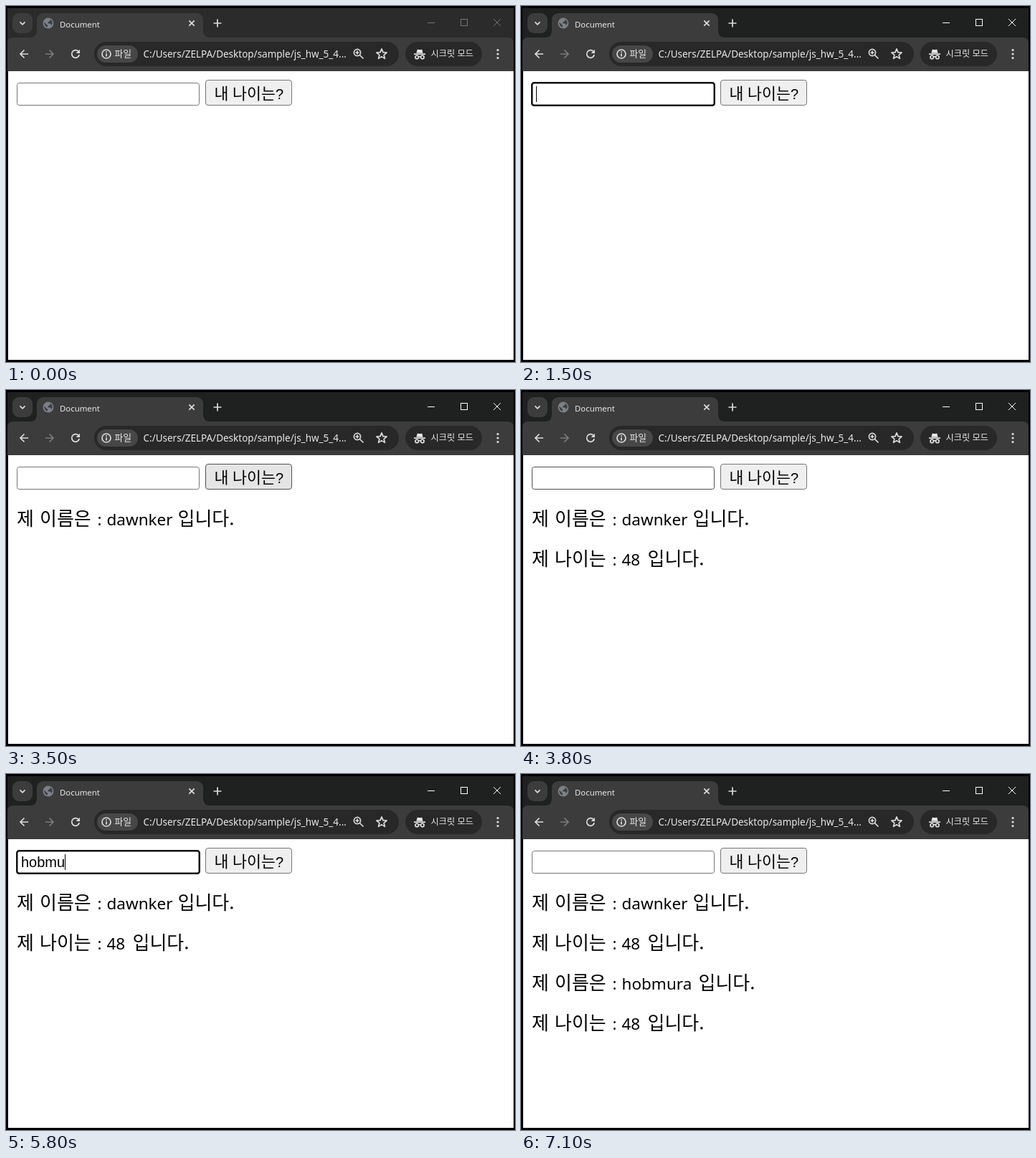
An HTML page that plays this animation: 710 px wide and 497 px high, repeating every 8000 ms.

```html
<!DOCTYPE html>
<html lang="ko">
<head>
<meta charset="utf-8">
<title>Document</title>
<style>
html, body { margin: 0; width: 100%; height: 100%; overflow: hidden; background: #000; }
svg { display: block; width: 710px; height: 497px; }
text { white-space: pre; }
.ui { font-family: "Noto Sans", "Noto Sans CJK KR", sans-serif; fill: #e8e8e8; }
.ko { font-family: "Noto Sans CJK KR", "Noto Sans CJK", sans-serif; }
.form { font: 20px "Liberation Sans", Arial, sans-serif; }
.label { font-size: 21.7px; font-weight: 300; }
.row .ko { font-size: 26px; }
.row .latin { font: 22.5px "Noto Sans", sans-serif; }
.line { fill: none; stroke: #dcdcdc; stroke-width: 1.7; }
.dim { stroke: #7c7c7c; }
#bar { fill: #1f2020; }
#controls { fill: none; stroke: #fff; }
.inactive #bar { fill: #2b2b2b; }
.inactive #controls { stroke: #777; }
#box { fill: #fff; stroke: #767676; }
#box.hover { stroke: #4f4f4f; }
#button { fill: #efefef; stroke: #767676; }
#button.hover { fill: #e5e5e5; stroke: #4f4f4f; }
#button.press { fill: #f5f5f5; stroke: #8d8d8d; }
</style>
</head>
<body>
<svg id="stage" viewBox="0 0 710 497">
  <rect width="710" height="497"/>
  <rect id="bar" x="2" y="3" width="706" height="60"/>
  <g fill="#3c3c3c">
    <path d="M2 91V52Q2 44 10 44H700Q708 44 708 52V91Z"/>
    <path d="M33 44Q43 44 43 34V20Q43 10 53 10H265Q275 10 275 20V34Q275 44 285 44Z"/>
    <rect x="9" y="10" width="28" height="28" rx="9"/>
  </g>
  <rect x="3" y="91" width="705" height="403" fill="#fff"/>

  <path class="line" d="M19.5 22.3L23 25.8L26.5 22.3"/>
  <g transform="translate(59 24)">
    <circle r="7.4" fill="#7d8186"/>
    <path d="M-5.8 -1.5L-1 3V5.6Q-5.5 4.5 -5.8 -1.5ZM-1 -5.6H2.5V-3L-.5 -1.5V.5H3L4 3L5.6 .5Q6 -4.5 1.5 -5.8Z" fill="#3c3c3c"/>
  </g>
  <text class="ui" x="75" y="30" font-size="11.4">Document</text>
  <path class="line" d="M255.3 20.3L262.7 27.7M262.7 20.3L255.3 27.7"/>
  <path class="line" d="M289.5 24H300.5M295 18.5V29.5"/>
  <g id="controls">
    <path d="M588 23.5H598"/>
    <rect x="634.5" y="18.5" width="9" height="9"/>
    <path d="M680 18L690 28M690 18L680 28"/>
  </g>

  <path id="arrow" class="line" d="M31 67H20M25.5 61.5L20 67L25.5 72.5"/>
  <path class="line dim" d="M55 67H66M60.5 61.5L66 67L60.5 72.5"/>
  <g transform="translate(97 67)">
    <path class="line" d="M4.4 -3A5.3 5.3 0 1 0 5.2 1"/>
    <path d="M6 -6.3V-1H.7Z" fill="#dcdcdc"/>
  </g>

  <rect x="123" y="50" width="425" height="34" rx="17" fill="#282828"/>
  <rect x="127" y="55" width="57" height="24" rx="12" fill="#474747"/>
  <circle class="line" cx="140" cy="67" r="6" stroke-width="1.5"/>
  <path class="line" d="M140 66.2V70.5M140 63.3V65"/>
  <text class="ui ko" x="151.5" y="71.3" font-size="12.8" font-weight="500">파일</text>
  <text class="ui" x="191.5" y="72" font-size="13.5">C:/Users/ZELPA/Desktop/sample/js_hw_5_4...</text>
  <g transform="translate(491.5 66.5)">
    <circle class="line" cx="-1.5" cy="-1.5" r="4.6"/>
    <path class="line" d="M2 2L7 7"/>
    <path class="line" stroke-width="1.2" d="M-4 -1.5H1M-1.5 -4V1"/>
  </g>
  <path class="line" stroke-linejoin="round" transform="translate(524 67.3)" stroke-width="1.5"
    d="M0 -7.5L1.94 -2.67L7.1 -2.3L3.1 1L4.4 6.1L0 3.3L-4.4 6.1L-3.1 1L-7.1 -2.3L-1.94 -2.67Z"/>

  <rect x="557" y="50" width="107" height="34" rx="17" fill="#282828"/>
  <g transform="translate(577 67)">
    <path d="M-4.6 -1.2L-3.2 -6.6Q0 -5.3 3.2 -6.6L4.6 -1.2Z" fill="#e8e8e8"/>
    <path class="line" d="M-8 .2H8M-1.5 4Q0 3 1.5 4"/>
    <circle class="line" cx="-3.8" cy="4.4" r="2.3"/>
    <circle class="line" cx="3.8" cy="4.4" r="2.3"/>
  </g>
  <text class="ui ko" x="592.5" y="71" font-size="12.2" font-weight="500">시크릿 모드</text>
  <g fill="#dcdcdc">
    <circle cx="686" cy="61.5" r="1.6"/><circle cx="686" cy="67" r="1.6"/><circle cx="686" cy="72.5" r="1.6"/>
  </g>

  <rect id="box" x="15.5" y="107.5" width="254" height="31" rx="3"/>
  <rect id="ring" x="15.25" y="107.25" width="254.5" height="31.5" rx="3" fill="#fff" stroke="#101010" stroke-width="2.5"/>
  <text id="typed" class="form" x="21" y="130"></text>
  <rect id="caret" y="112" width="1" height="22"/>
  <rect id="button" x="278.5" y="103.5" width="120" height="35" rx="3.5"/>
  <text class="ko label" x="290.5" y="130">내</text>
  <text class="ko label" x="316" y="130">나이는</text>
  <text class="form" x="376" y="130">?</text>
  <g id="rows"></g>
</svg>
<script>
const LOOP = 8000;
const $ = id => document.getElementById(id);
const names = ["dawnker", "hobmura"];

// [time, value] steps; each value holds until the next step
const at = (steps, t) => steps.reduce((v, [from, next]) => t >= from ? next : v, steps[0][1]);

const focus = [[0, 0], [500, 1], [3400, 0], [4100, 1], [6800, 0]];
const boxState = [[0, ""], [300, "hover"], [3300, ""], [3800, "hover"], [6700, ""]];
const buttonState = [
  [0, ""], [3300, "hover"], [3400, "press"], [3500, "hover"], [3700, ""],
  [6700, "hover"], [6800, "press"], [6900, "hover"], [7100, ""]
];
const caretOn = [
  [0, 0], [500, 1], [1000, 0], [1500, 1], [2000, 0], [2200, 1], [3300, 0],
  [4100, 1], [4600, 0], [5000, 1], [6500, 0]
];
const letters = [
  [0, 0], [2200, 2], [2300, 3], [2500, 4], [2700, 5], [2800, 7], [3500, 0],
  [5000, 1], [5100, 2], [5400, 3], [5600, 4], [5800, 5], [5900, 6], [6000, 7], [6900, 0]
];
const rowTimes = [3500, 3600, 6900, 7000];

function row(y, label, value, endX) {
  const put = (cls, x, s) => `<text class="${cls}" x="${x}" y="${y}">${s}</text>`;
  return `<g class="row">${put("ko", 15, "제")}${put("ko", 47, label)}${put("latin", 127.5, ":")}` +
    `${put("latin", 140.5, value)}${put("ko", endX, "입니다.")}</g>`;
}
$("rows").innerHTML =
  row(189, "이름은", names[0], 239.5) + row(245, "나이는", "48", 176.5) +
  row(301, "이름은", names[1], 247.5) + row(357, "나이는", "48", 176.5);
const rows = [...$("rows").children];

const show = (el, on) => el.setAttribute("visibility", on ? "visible" : "hidden");

function draw() {
  const t = performance.now() % LOOP;
  const typed = $("typed");
  const text = names[t < 4000 ? 0 : 1].slice(0, at(letters, t));
  if (typed.textContent !== text) typed.textContent = text;
  const width = text ? typed.getComputedTextLength() : 0;
  $("caret").setAttribute("x", Math.floor(21 + width));
  show($("caret"), at(caretOn, t));
  show($("ring"), at(focus, t));
  $("box").setAttribute("class", at(boxState, t));
  $("button").setAttribute("class", at(buttonState, t));
  $("stage").setAttribute("class", t < 500 ? "inactive" : "");
  rows.forEach((el, i) => show(el, t >= rowTimes[i]));
  requestAnimationFrame(draw);
}
draw();
</script>
</body>
</html>
```
